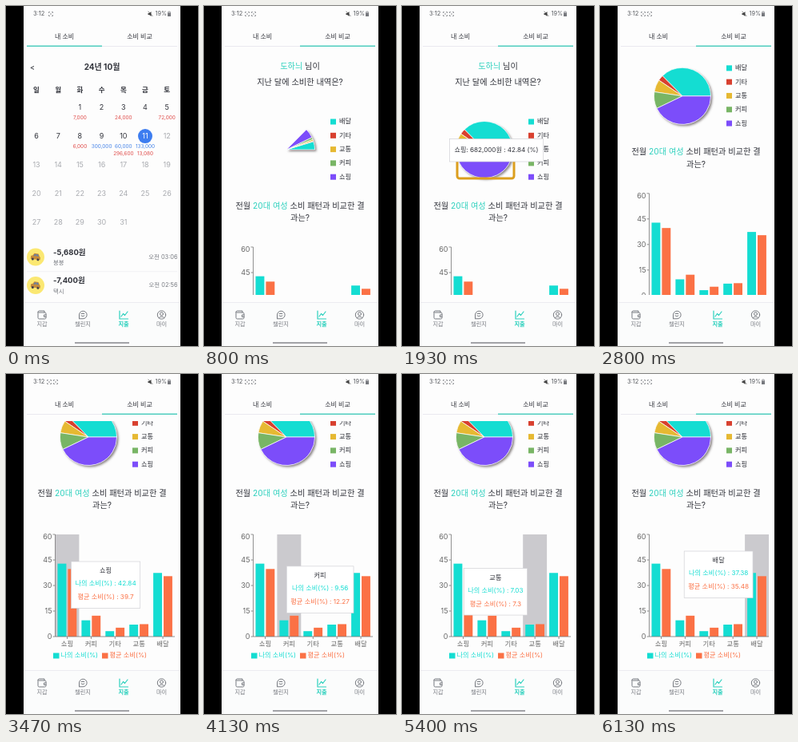
An HTML page with a canvas for the animation above (6190 ms loop, 240 px wide and 426 px high).

```html
<!DOCTYPE html>
<html lang="ko">
<head>
<meta charset="utf-8">
<title>소비 비교</title>
<style>
html, body { margin: 0; width: 100%; height: 100%; overflow: hidden; background: #000; }
canvas { display: block; width: 240px; height: 426px; }
</style>
</head>
<body>
<canvas id="stage"></canvas>
<script>
const W = 240, H = 426, LOOP = 6190;
const canvas = document.getElementById('stage');
const c = canvas.getContext('2d');
const dpr = window.devicePixelRatio || 1;
canvas.width = W * dpr;
canvas.height = H * dpr;

const FONT = 'Inter, "Noto Sans CJK KR", "Noto Sans CJK", sans-serif';
const INK = '#30323a', GRAY = '#777a80', PALE = '#a9abb0', PAPER = '#fdfdfd', RULE = '#e6e5ee';
const TEAL = '#14ddd2', ORANGE = '#fb7145', ACCENT = '#2bd0bd', RED = '#e0504e', BLUE = '#4a86e8';

// name, my share, average share, colour
const DATA = [
  ['쇼핑', 42.84, 39.7, '#7c4dfa'],
  ['커피', 9.56, 12.27, '#78b565'],
  ['기타', 3.19, 5.22, '#d8402f'],
  ['교통', 7.03, 7.3, '#e6b932'],
  ['배달', 37.38, 35.48, TEAL]
];
const PIE_ORDER = [4, 2, 3, 1, 0];

// Times
const SWITCH = 500, PIE_START = 712, PIE_TIME = 750, TAP = 1700, UNTAP = 2450;
const SCROLL_START = 2530, SCROLL_END = 2973, SCROLL = 101;
const HITS = [3418, 4044, 4670, 5290, 5900];
const TIP_Y = [235, 243, 264, 240, 222];

// Chart box, in unscrolled page coordinates
const LEFT = 61.5, RIGHT = 211, TOP = 302, BASE = 430, BAND = (RIGHT - LEFT) / 5;

const clamp = x => Math.min(1, Math.max(0, x));
const mix = (a, b, k) => a + (b - a) * k;
const bezier = (a, b, s) => 3 * a * s * (1 - s) ** 2 + 3 * b * s * s * (1 - s) + s ** 3;

// The CSS "ease" curve
function ease(x) {
  x = clamp(x);
  let lo = 0, hi = 1;
  for (let i = 0; i < 20; i++) {
    const mid = (lo + hi) / 2;
    if (bezier(.25, .25, mid) < x) lo = mid; else hi = mid;
  }
  return bezier(.1, 1, lo);
}

function text(str, x, y, size, color = INK, align = 'center', weight = 400) {
  c.font = `${weight} ${size}px ${FONT}`;
  c.fillStyle = color;
  c.textAlign = align;
  c.textBaseline = 'middle';
  c.fillText(str, x, y);
  return c.measureText(str).width;
}

function rect(x, y, w, h, color) {
  c.fillStyle = color;
  c.fillRect(x, y, w, h);
}

function disc(x, y, r, color) {
  c.fillStyle = color;
  c.beginPath();
  c.arc(x, y, r, 0, 7);
  c.fill();
}

function path(d, color, width = 1, x = 0, y = 0) {
  c.save();
  c.translate(x, y);
  c.strokeStyle = color;
  c.lineWidth = width;
  c.lineJoin = c.lineCap = 'round';
  c.stroke(new Path2D(d));
  c.restore();
}

// Two-colour line of text centred on x
function duo(parts, x, y, size) {
  c.font = `400 ${size}px ${FONT}`;
  x -= c.measureText(parts.map(p => p[0]).join('')).width / 2;
  for (const [str, color] of parts) x += text(str, x, y, size, color, 'left');
}

function header(t) {
  const compare = t >= SWITCH;
  text('3:12', 34, 10, 7.5, '#55575c', 'left');
  for (const x of compare ? [54, 62] : [56])
    path('M-2.5-1.5V-2.5H-1.5 M1.5-2.5H2.5V-1.5 M2.5 1.5V2.5H1.5 M-1.5 2.5H-2.5V1.5 M-.7 0H.7', '#77797e', .8, x, 10);
  c.fillStyle = '#444';
  c.fill(new Path2D('M177.5 9H179L181.5 7V13L179 11H177.5Z'));
  path('M178 7L183 12.5', '#444', .7);
  text('19%', 186.5, 10, 7.2, '#55575c', 'left');
  rect(202, 8.5, 4, 4.5, '#77797e');
  path('M202.8 8.5V7H205.2V8.5', '#77797e', .7);

  text('내 소비', 73, 39, 8, INK, 'center', 500);
  text('소비 비교', 167, 39, 8, INK, 'center', 500);
  rect(26, 50, 188, .8, RULE);
  rect(mix(26, 120, ease((t - SWITCH) / 150)), 49.5, 94, 1.4, '#43cbbb');
}

function car(x, y) {
  disc(x, y, 11, '#fbe872');
  c.save();
  c.translate(x, y);
  c.rotate(.12);
  c.fillStyle = '#c58b3c';
  c.fill(new Path2D('M-6 3V-1L-4-1.5L-2-4.5H3L5-1L6 0V3Z'));
  c.fillStyle = '#5d7fae';
  c.fill(new Path2D('M-2.8-1.2L-1.4-3.6H.2V-1.2Z M1-3.6H2.6L3.8-1.2H1Z'));
  disc(-3.3, 3, 1.5, '#45414a');
  disc(3.3, 3, 1.5, '#45414a');
  c.restore();
}

function calendar() {
  const col = i => 38 + i * 27.2;
  text('<', 33, 77, 9, INK, 'center', 500);
  text('24년 10월', 120, 77, 10, INK, 'center', 700);
  [...'일월화수목금토'].forEach((d, i) => text(d, col(i), 105, 8.5, INK, 'center', 600));

  for (let d = 1; d <= 31; d++) {
    const cell = d + 1, x = col(cell % 7), y = 127 + Math.floor(cell / 7) * 36.1;
    if (d === 11) disc(x, y, 9, '#3d7df0');
    text(d, x, y, 9, d === 11 ? '#fff' : d < 11 ? INK : PALE);
  }
  const sums = [
    ['7,000', 2, 140, RED], ['24,000', 4, 140, RED], ['72,000', 6, 140, RED],
    ['6,000', 2, 176, RED], ['300,000', 3, 176, BLUE], ['60,000', 4, 176, BLUE],
    ['133,000', 5, 176, BLUE], ['296,600', 4, 185, RED], ['13,080', 5, 185, RED]
  ];
  for (const [sum, i, y, color] of sums) text(sum, col(i), y, 6.4, color);

  const spent = [['-5,680원', '붕붕', '오전 03:06', 309], ['-7,400원', '택시', '오전 02:56', 344.5]];
  for (const [sum, label, time, y] of spent) {
    car(37, y + 5.5);
    text(sum, 59, y, 9.5, INK, 'left', 700);
    text(label, 59, y + 13, 7.4, GRAY, 'left');
    text(time, 214.5, y + 5.5, 7.4, GRAY, 'right');
  }
  rect(26, 332.5, 188, .7, '#ececf0');
}

function pie(t) {
  const k = ease((t - PIE_START) / PIE_TIME), x = 103, y = 180, r = 35.5;
  if (k <= 0) return;
  const wedge = (a, b) => {
    c.beginPath();
    c.moveTo(x, y);
    c.arc(x, y, r, -a, -b, true);
    c.closePath();
  };
  const full = Math.PI * 2 * k;
  c.save();
  c.shadowColor = 'rgba(60,50,50,.6)';
  c.shadowBlur = 3 * dpr;
  c.shadowOffsetX = c.shadowOffsetY = 2 * dpr;
  c.fillStyle = '#fff';
  wedge(0, full);
  c.fill();
  c.restore();

  let a = 0;
  for (const i of PIE_ORDER) {
    const b = a + DATA[i][1] / 100 * full;
    wedge(a, b);
    c.fillStyle = DATA[i][3];
    c.fill();
    c.strokeStyle = '#fff';
    c.lineWidth = .7;
    c.stroke();
    a = b;
  }
}

function tipBox(x, y, w, h) {
  rect(x, y, w, h, '#fff');
  c.strokeStyle = '#d2d2d6';
  c.lineWidth = .7;
  c.strokeRect(x, y, w, h);
}

function pieTip() {
  c.strokeStyle = '#dc9f1e';
  c.lineWidth = 3;
  c.beginPath();
  c.roundRect(69, 180, 71, 36, 3);
  c.stroke();
  tipBox(59.5, 166.5, 117, 28.5);
  text('쇼핑: 682,000원 : 42.84 (%)', 118, 180.8, 8.1);
}

function tipLines(i) {
  return [`나의 소비(%) : ${DATA[i][1]}`, `평균 소비(%) : ${DATA[i][2]}`];
}

// Size and resting place of the tooltip for one category
function tipPlace(i) {
  c.font = `400 8.2px ${FONT}`;
  const w = Math.max(...tipLines(i).map(s => c.measureText(s).width)) + 10;
  const mid = LEFT + (i + .5) * BAND;
  const x = mid + 5 + w > RIGHT ? mid - 5 - w : mid + 5;
  return { x, y: TIP_Y[i] + SCROLL, w };
}

function barTip(t, i) {
  const to = tipPlace(i), from = i ? tipPlace(i - 1) : to;
  const k = ease((t - HITS[i]) / 200);
  const x = mix(from.x, to.x, k), y = mix(from.y, to.y, k), mid = x + to.w / 2;
  tipBox(x, y, to.w, 58.5);
  text(DATA[i][0], mid, y + 12, 8.2);
  tipLines(i).forEach((s, n) => text(s, mid, y + 27.5 + n * 17.5, 8.2, n ? ORANGE : TEAL));
}

function chart(t, active) {
  const k = ease((t - SWITCH) / 200), unit = (BASE - TOP) / 60;
  if (active >= 0) rect(LEFT + active * BAND, TOP, BAND, BASE - TOP, '#cbcace');
  DATA.forEach(([name, mine, mean], i) => {
    const x = LEFT + i * BAND + 3;
    [mine, mean].forEach((v, n) => {
      const h = v * unit * k;
      rect(x + n * 12.9, BASE - h, 10.9, h, n ? ORANGE : TEAL);
    });
    const mid = LEFT + (i + .5) * BAND;
    rect(mid - .4, BASE, .8, 3, '#777');
    text(name, mid, 439, 8.4, '#666');
  });
  rect(LEFT - .4, TOP, .8, BASE - TOP, '#777');
  rect(LEFT, BASE - .4, RIGHT - LEFT, .8, '#777');
  for (let v = 0; v <= 60; v += 15) {
    const y = BASE - v * unit;
    rect(LEFT - 3, y - .4, 3, .8, '#777');
    text(v, 57.5, v === 60 ? y + 3.5 : y, 9, '#666', 'right');
  }
  rect(59, 450.5, 7.5, 7, TEAL);
  text('나의 소비(%)', 68.5, 454, 8.2, TEAL, 'left');
  rect(120, 450.5, 7.5, 7, ORANGE);
  text('평균 소비(%)', 129.5, 454, 8.2, ORANGE, 'left');
}

function compare(t) {
  const s = clamp((t - SCROLL_START) / (SCROLL_END - SCROLL_START));
  const active = HITS.filter(h => t >= h).length - 1;
  c.save();
  c.beginPath();
  c.rect(22, 59, 196, 303);
  c.clip();
  c.translate(0, -SCROLL * s * s * (3 - 2 * s));

  duo([['도하늬', ACCENT], [' 님이', INK]], 120, 75.5, 10.2);
  text('지난 달에 소비한 내역은?', 120, 95.5, 10.2);
  pie(t);
  PIE_ORDER.forEach((i, n) => {
    const y = 145 + n * 17.3;
    rect(158, y - 3.5, 7, 7, DATA[i][3]);
    text(DATA[i][0], 169, y, 8.2, INK, 'left');
  });
  if (t >= TAP && t < UNTAP) pieTip();

  duo([['전월 ', INK], ['20대 여성', ACCENT], [' 소비 패턴과 비교한 결', INK]], 120, 250.5, 10.2);
  text('과는?', 120, 266, 10.2);
  chart(t, active);
  if (active >= 0) barTip(t, active);
  c.restore();
}

function nav() {
  rect(22, 371, 196, 55, '#fbfcfc');
  rect(22, 371, 196, .8, '#e9e9ee');
  path('M-5-3.5Q-5-5-3.5-5H3V-3 M-5-3.5V3.5Q-5 5-3.5 5H3.5Q5 5 5 3.5V-1.5Q5-3 3.5-3H-4 M5 0H2.5V2.5H5', GRAY, 1, 45, 387);
  path('M-4.5 4.5V0A4.8 4.8 0 1 1 0 4.8H-4.5 M-2 1Q0 3 2 1 M-1.8-1.5H1.8', GRAY, 1, 96, 387);
  path('M-5-5V5H5.5 M-3 2L-.5-1.5L1.5 .5L5-4', ACCENT, 1.2, 147, 387);
  path('M5.2 0A5.2 5.2 0 1 1-5.2 0A5.2 5.2 0 1 1 5.2 0 M2-1.2A2 2 0 1 1-2-1.2A2 2 0 1 1 2-1.2 M-3.4 3.8Q0 .2 3.4 3.8', GRAY, 1, 194.5, 387);
  [['지갑', 45], ['챌린지', 96], ['지출', 147], ['마이', 194.5]].forEach(([s, x], i) =>
    text(s, x, 398.7, 7.2, i === 2 ? ACCENT : GRAY, 'center', i === 2 ? 600 : 400));
  rect(86, 421.3, 68, 1.5, '#85868c');
}

function draw(t) {
  c.setTransform(dpr, 0, 0, dpr, 0, 0);
  rect(0, 0, W, H, '#000');
  rect(22, 0, 196, H, PAPER);
  header(t);
  if (t < SWITCH) calendar(); else compare(t);
  nav();
}

const start = performance.now();
function tick() {
  draw((performance.now() - start) % LOOP);
  requestAnimationFrame(tick);
}
tick();
</script>
</body>
</html>
```
